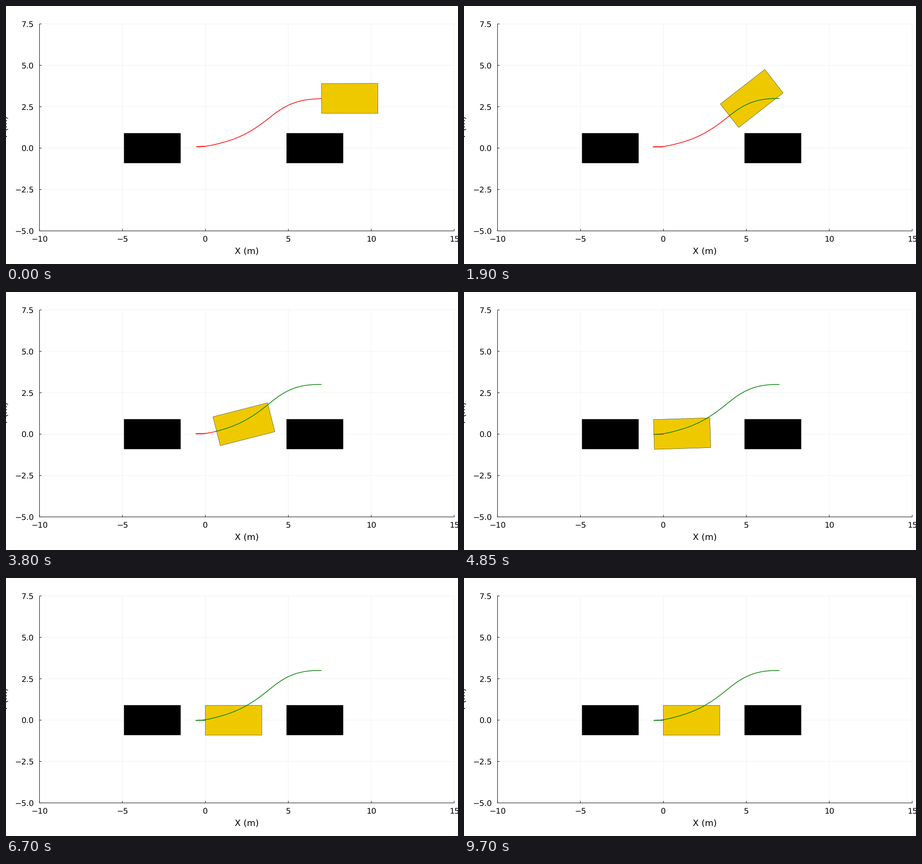
These frames come from a looping animation (990 by 566 pixels, 10 s). A matplotlib script:

```python
import numpy as np
import matplotlib.pyplot as plt
from matplotlib.animation import FuncAnimation
from matplotlib.patches import Polygon

W, H, DPI = 990, 566, 100
FRAMES, STEP = 200, 50
X0, Y0, UNIT = 436.7, 311.8, 36.33      # world origin and scale in pixels
LEFT, RIGHT, TOP, BOTTOM = 73.4, 981.7, 39.4, 493.4
PT = 72 / DPI

START, GOAL = np.array([7.0, 3.0]), np.array([0.0, -0.011])
CRUISE, BRAKE, STOP, PARKED = 2.0, 3.5, 4.9, 6.5     # m/s, then times in s

plt.rcParams["font.family"] = "DejaVu Sans"
plt.rcParams["text.hinting"] = "none"


def smooth(u):
    u = np.clip(u, 0, 1)
    return u * u * (3 - 2 * u)


def to_px(x, y):
    return X0 + UNIT * np.asarray(x), Y0 - UNIT * np.asarray(y)


def speed(t):
    """Reverse with a ramp, a cruise and a brake, then ease forward."""
    ramp = np.minimum(t / 0.52, 1)
    brake = 1 - (np.clip(t - BRAKE, 0, STOP - BRAKE) / (STOP - BRAKE)) ** 2
    u = np.clip((t - STOP) / (PARKED - STOP), 0, 1)
    return -CRUISE * ramp * brake + 0.578 / (PARKED - STOP) * 6 * u * (1 - u)


def heading_at(dist):
    """Heading in radians: one turn in and three turns back, eased over distance."""
    turns = ((38.3, -0.12, 3.5), (-25, 3.3, 7.6), (-11.8, 7.2, 8.45), (-1.5, 8.4, 8.95))
    return np.radians(sum(a * smooth((dist - s0) / (s1 - s0)) for a, s0, s1 in turns))


def drive():
    """Integrate the motion and fit it between the start and the parking spot."""
    sub = 50
    dt = STEP / 1000 / sub
    v = speed((np.arange(FRAMES * sub) + 0.5) * dt)
    heading = heading_at(np.cumsum(np.abs(v)) * dt)
    move = np.column_stack([v * np.cos(heading), v * np.sin(heading)]) * dt
    path = np.vstack([[0, 0], np.cumsum(move, axis=0)])
    path = START + path * (GOAL - START) / path[-1]
    return path[:-1:sub].T, heading[::sub]


times = np.arange(FRAMES) * STEP / 1000
(xs, ys), headings = drive()


def car_corners(x, y, heading):
    c, s = np.cos(heading), np.sin(heading)
    along = np.array([0, 3.4, 3.4, 0])
    side = np.array([0.9, 0.9, -0.9, -0.9])
    return np.column_stack(to_px(x + along * c - side * s, y + along * s + side * c))


def planned_path(i):
    """Prediction from the current pose: drifts a little from the driven path."""
    t = times[i]
    reach = (-0.06 + 0.16 * np.sin(np.pi * t / 0.2875) ** 2) * (1 - smooth(t - 3))
    x = np.where(xs[i:] < 0, xs[i:] * (1 + reach), xs[i:])
    u = np.clip((times[i:] - t) / max(STOP - t, 0.5), 0, 1)
    drift = 0.11 * max(1 - (t / 5) ** 2, 0) * u
    early = 0.45 * np.exp(-2 * t) * u * (1 - u) ** 2
    return to_px(x, ys[i:] + drift - early)


fig = plt.figure(figsize=(W / DPI, H / DPI), dpi=DPI, facecolor="white")
ax = fig.add_axes([0, 0, 1, 1])
ax.set_xlim(0, W)
ax.set_ylim(H, 0)
ax.axis("off")


def line(x, y, color="black", width=1.0, z=1):
    return ax.plot(x, y, color=color, lw=width * PT, zorder=z, snap=False,
                   solid_capstyle="butt", solid_joinstyle="round")[0]


def label(x, y, text, size, **kw):
    ax.text(x, y, text, fontsize=size * PT, va="baseline", **kw)


def number(value, digits):
    return f"{value:.{digits}f}".replace("-", "\u2212")


GRID, TICK, TICK_SIZE, NAME_SIZE = "#f0f0f0", 4.5, 17.2, 19.2

for v in np.arange(-10, 16, 5):
    x = to_px(v, 0)[0]
    line([x, x], [TOP, BOTTOM], GRID)
    line([x, x], [BOTTOM - TICK, BOTTOM], z=2)
    label(x, 517, number(v, 0), TICK_SIZE, ha="center")

for v in np.arange(-5, 8, 2.5):
    y = to_px(0, v)[1]
    line([LEFT, RIGHT], [y, y], GRID)
    line([LEFT, LEFT + TICK], [y, y], z=2)
    label(61, y + 6.3, number(v, 1), TICK_SIZE, ha="right")

line([LEFT, LEFT], [TOP, BOTTOM], z=2)
line([LEFT, RIGHT], [BOTTOM, BOTTOM], z=2)
label((LEFT + RIGHT) / 2, 543, "X (m)", NAME_SIZE, ha="center")
label(2.2, (TOP + BOTTOM) / 2, "Y (m)", NAME_SIZE, ha="center",
      rotation=90, rotation_mode="anchor")


def box(x, color, z):
    return ax.add_patch(Polygon(car_corners(x, 0, 0), closed=True, facecolor=color,
                                edgecolor="black", lw=0.5 * PT, snap=False, zorder=z))


for parked in (-4.9, 4.9):
    box(parked, "black", 3)
car = box(0, "#eec900", 4)
plan = line([], [], "#ff0000", 1.5, 5)
trail = line([], [], "#008000", 1.5, 6)


def draw(i):
    car.set_xy(car_corners(xs[i], ys[i], headings[i]))
    plan.set_data(*planned_path(i))
    trail.set_data(*to_px(xs[:i + 1], ys[:i + 1]))
    return car, plan, trail


anim = FuncAnimation(fig, draw, frames=FRAMES, interval=STEP,
                     repeat=True, repeat_delay=0, blit=False)
plt.show()
```
